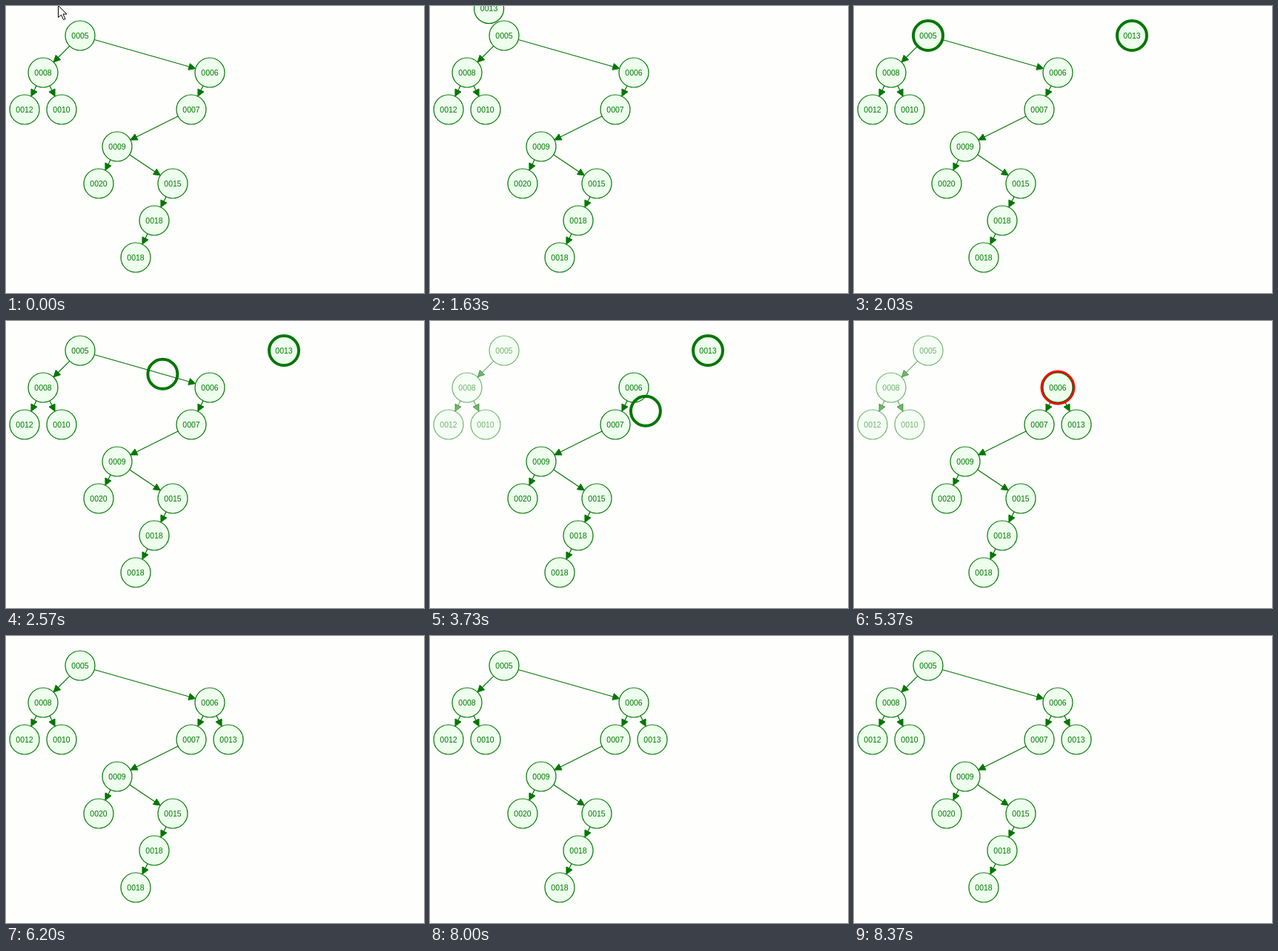
An HTML page with a canvas that plays this animation: 564 px wide and 388 px high, repeating every 9010 ms.

```html
<!DOCTYPE html>
<html lang="en">
<head>
<meta charset="utf-8">
<style>
  html, body { margin: 0; width: 100%; height: 100%; overflow: hidden; background: #fefefc; }
  canvas { display: block; }
</style>
</head>
<body>
<canvas id="stage" width="564" height="388"></canvas>
<script>
const ctx = document.getElementById('stage').getContext('2d');
const LOOP = 9010, STEP = 32, MOVES = 11, RADIUS = 20;
const GREEN = '#007700', RED = '#ff0000', FILL = '#eeffee', PAPER = '#fefefc';

// Start of each stage of the merge, in ms
const AT = {
  insert: 1628, rings: 1994, descend: 2376, detach: 3098, descendAgain: 3536,
  attach: 4628, checkChild: 5368, reconnect: 5738, restore: 6100,
  checkRoot: 6468, done: 6840
};

const node = (label, x, y, parent, left) => ({ label, x, y, parent, left });
const root = node('0005', 100, 40);
const n8 = node('0008', 50, 90, root, true);
const n12 = node('0012', 25, 140, n8, true);
const n10 = node('0010', 75, 140, n8, true);
const n6 = node('0006', 275, 90, root);
const n7 = node('0007', 250, 140, n6);
const n9 = node('0009', 150, 190, n7);
const n20 = node('0020', 125, 240, n9);
const n15 = node('0015', 225, 240, n9);
const n18 = node('0018', 200, 290, n15);
const last = node('0018', 175, 340, n18);
const tree = [root, n8, n12, n10, n6, n7, n9, n20, n15, n18, last];

const waiting = { x: 375, y: 40 };
const slot = { x: 300, y: 140 };

const between = (t, a, b) => t >= a && t < b;
const mix = (a, b, p) => ({ x: a.x + (b.x - a.x) * p, y: a.y + (b.y - a.y) * p });
const progress = (t, start) =>
  Math.max(0, Math.min(MOVES, Math.floor((t - start) / STEP) + 1)) / MOVES;

function paint(fill, stroke, width) {
  if (fill) {
    ctx.fillStyle = fill;
    ctx.fill();
  }
  ctx.strokeStyle = stroke;
  ctx.lineWidth = width;
  ctx.stroke();
}

function circle({ x, y }, r) {
  ctx.beginPath();
  ctx.arc(x, y, r, 0, Math.PI * 2);
}

function drawRing(p) {
  circle(p, RADIUS);
  paint(null, GREEN, 4);
}

function drawEdge(from, to) {
  const dx = to.x - from.x, dy = to.y - from.y, d = Math.hypot(dx, dy);
  const ux = dx / d, uy = dy / d;
  const tip = { x: to.x - ux * RADIUS, y: to.y - uy * RADIUS };
  const base = { x: tip.x - ux * 9, y: tip.y - uy * 9 };
  ctx.beginPath();
  ctx.moveTo(from.x + ux * RADIUS, from.y + uy * RADIUS);
  ctx.lineTo(base.x, base.y);
  paint(null, GREEN, 1.2);
  ctx.beginPath();
  ctx.moveTo(tip.x, tip.y);
  ctx.lineTo(base.x - uy * 4.5, base.y + ux * 4.5);
  ctx.lineTo(base.x + uy * 4.5, base.y - ux * 4.5);
  ctx.closePath();
  paint(GREEN, GREEN, 1);
}

function drawNode(p, label) {
  circle(p, RADIUS);
  paint(FILL, GREEN, 1.2);
  ctx.fillStyle = GREEN;
  ctx.fillText(label, p.x, p.y + 3.5);
}

// Red halo that swells and shrinks by a pixel on every step
function drawHalo(p, age) {
  const phase = Math.floor(age / STEP) % 4;
  circle(p, RADIUS + 5 - Math.abs(phase - 2));
  paint(RED, RED, 1);
}

function drawCursor(t) {
  if (t >= 930) return;
  const p = Math.max(0, Math.min(1, (t - 650) / 280));
  ctx.save();
  ctx.translate(70.5 + 363 * p, -0.5 - 14 * p * p);
  ctx.beginPath();
  [[0, 0], [0, 16], [4, 12.5], [7, 19], [9.5, 18], [6.5, 11.5], [11.5, 11.5]]
    .forEach(([x, y]) => ctx.lineTo(x, y));
  ctx.closePath();
  paint('#fff', '#000', 1);
  ctx.restore();
}

function draw(t) {
  ctx.fillStyle = PAPER;
  ctx.fillRect(0, 0, 564, 388);
  ctx.font = '10.5px "Liberation Sans", Arial, sans-serif';
  ctx.textAlign = 'center';

  const faded = between(t, AT.detach, AT.restore);
  const alphaOf = n => faded && (n === root || n.left) ? 0.55 : 1;
  const added = t < AT.attach
    ? mix({ x: 50, y: 0 }, waiting, progress(t, AT.insert))
    : mix(waiting, slot, progress(t, AT.attach));

  for (const n of tree) {
    if (!n.parent || (n === n6 && between(t, AT.detach, AT.reconnect))) continue;
    ctx.globalAlpha = alphaOf(n);
    drawEdge(n.parent, n);
  }
  ctx.globalAlpha = 1;

  if (t >= AT.attach) drawEdge(n6, added);
  if (t >= AT.insert) drawNode(added, '0013');
  if (between(t, AT.checkChild, AT.reconnect)) drawHalo(n6, t - AT.checkChild);
  if (between(t, AT.checkRoot, AT.done)) drawHalo(root, t - AT.checkRoot);

  for (const n of tree) {
    ctx.globalAlpha = alphaOf(n);
    drawNode(n, n.label);
  }
  ctx.globalAlpha = 1;

  if (between(t, AT.rings, AT.attach)) {
    drawRing(waiting);
    drawRing(t < AT.descendAgain
      ? mix(root, n6, progress(t, AT.descend))
      : mix(n6, slot, progress(t, AT.descendAgain)));
  }
  drawCursor(t);
}

const start = performance.now();
function frame() {
  draw((performance.now() - start) % LOOP);
  requestAnimationFrame(frame);
}
frame();
</script>
</body>
</html>
```
